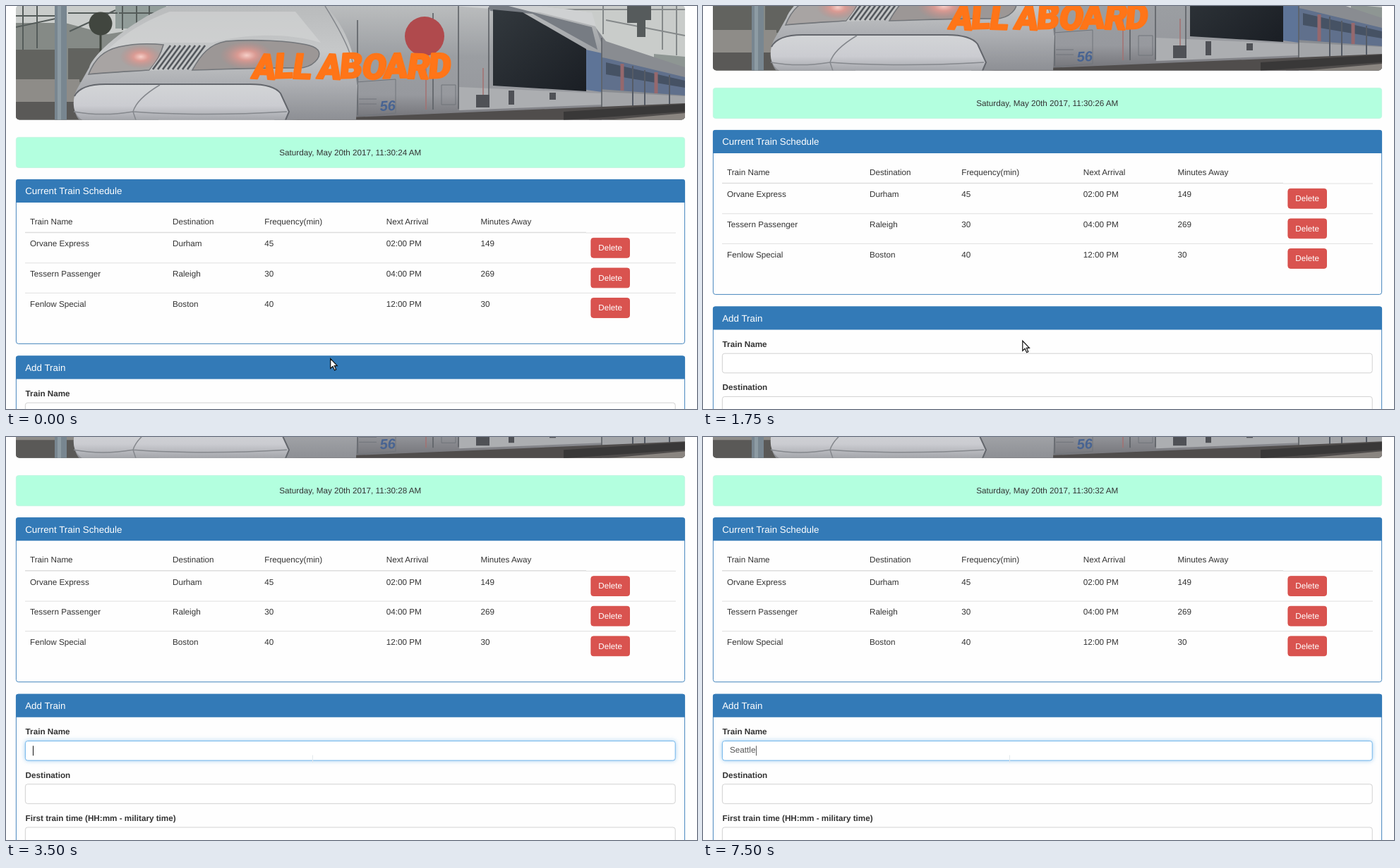
Write an HTML page that moves like this. It is 979 px wide and 572 px high and loops after 8 s.

```html
<!DOCTYPE html>
<html lang="en">
<head>
<meta charset="utf-8">
<title>Train schedule</title>
<style>
  html, body { margin: 0; width: 100%; height: 100%; overflow: hidden; background: #fefefe; }
  svg { display: block; }
  text { font: 11.7px "Liberation Sans", Arial, sans-serif; fill: #333; white-space: pre;
    text-rendering: geometricPrecision; }
  .title { font-size: 13.35px; fill: #fff; }
  .label { font-weight: bold; }
  .mid { text-anchor: middle; }
  .light { fill: #fff; }
  .typed { fill: #555; }
  .number { font: italic bold 20px "Liberation Sans", Arial, sans-serif; fill: #486492; }
  .banner { font: 900 49px Roboto, "Open Sans", sans-serif; letter-spacing: -1.2px; word-spacing: -1px;
    fill: #ff7518; stroke: #ff7518; stroke-width: 2.6; stroke-linejoin: round; }
  .field { fill: #fff; stroke: #ccc; stroke-width: .9; }
  .field.focus { stroke: #66afe9; filter: drop-shadow(0 0 3px rgba(102, 175, 233, .6)); }
</style>
</head>
<body>
<svg width="979" height="572" viewBox="0 0 979 572">
  <defs>
    <clipPath id="photo"><rect x="14" y="-1" width="948" height="162.5" rx="5"/></clipPath>
    <linearGradient id="nose" x1="0" y1="0" x2="0" y2="1">
      <stop offset="0" stop-color="#b9bbbc"/><stop offset=".4" stop-color="#c6c8c9"/>
      <stop offset=".7" stop-color="#abadb1"/><stop offset="1" stop-color="#8d8f94"/>
    </linearGradient>
    <linearGradient id="bonnet" x1="0" y1="0" x2="0" y2="1">
      <stop offset="0" stop-color="#d3d5d7"/><stop offset=".6" stop-color="#cbccd1"/>
      <stop offset="1" stop-color="#a3a5aa"/>
    </linearGradient>
    <linearGradient id="side" x1="0" y1="0" x2="0" y2="1">
      <stop offset="0" stop-color="#bbbdbe"/><stop offset=".45" stop-color="#9b9ea2"/>
      <stop offset=".78" stop-color="#97999e"/><stop offset="1" stop-color="#717176"/>
    </linearGradient>
    <linearGradient id="glass" x1="0" y1="0" x2="1" y2="1">
      <stop offset="0" stop-color="#33393e"/><stop offset="1" stop-color="#1a1e24"/>
    </linearGradient>
    <radialGradient id="lamp">
      <stop offset="0" stop-color="#f7cfc8"/><stop offset=".35" stop-color="#e09a92" stop-opacity=".9"/>
      <stop offset="1" stop-color="#c08a85" stop-opacity="0"/>
    </radialGradient>
  </defs>

  <g id="page">
    <g clip-path="url(#photo)">
      <!-- station -->
      <path fill="#c9ccca" d="M14-1h948v163H14z"/>
      <path fill="#858a86" d="M14 24h70l60 16 72-12v134H14z"/>
      <path fill="#62635f" d="M14 62h60v44H14zM88 60h45v48H88z"/>
      <path fill="#8e8c88" d="M14 104h90v57H14z"/>
      <path fill="#5a5957" d="M14 136h94v26H14z"/>
      <path fill="#929d9a" d="M155 0h72v32h-72z"/>
      <path fill="none" stroke="#555c5a" stroke-width="2" d="M14 14h58M14 30l56-12M24 0v62M44 0v60M88 10h70M90 36l65-30M160 10h55M165 0v34M185 0v34M203 0v26"/>
      <path fill="#788690" d="M69 0h17v162H69z"/>
      <path fill="#8d9ba3" d="M73 0h5v162h-5z"/>
      <circle cx="134" cy="25" r="16.5" fill="#41463f"/>
      <path stroke="#41463f" stroke-width="3" d="M134 40v28"/>

      <!-- far coaches, gantry -->
      <path fill="none" stroke="#85898a" stroke-width="2" d="M770 5h192M850 20l112 22M846 0v40M930 0v62M950 0v70"/>
      <path fill="#565b5c" d="M880 0h34v20h-8v24h-12V24h-14z"/>
      <path fill="#8e9693" d="M918 68l44 4v25h-44z"/>
      <path fill="#898c91" d="M826 18l24 32 112 37v75H826z"/>
      <path fill="#60708c" d="M828 70l22 4 112 27v26l-134-10z"/>
      <path fill="#465264" d="M850 80l112 26v10l-112-19z"/>
      <path fill="#a3a5a8" d="M828 121l134 7v14l-134 2z"/>
      <path stroke="#96686d" stroke-width="5" d="M873 82v38M921 94v30"/>
      <path stroke="#555b65" stroke-width="2" d="M888 85v58M905 91v52M940 98v44"/>

      <!-- power car -->
      <path fill="url(#side)" d="M400-1h350l78 10 16 45v108H380z"/>
      <path fill="#cfd1d2" d="M620-1h130l80 10 6 20-80-20z"/>
      <path fill="#777c83" d="M684 0h28l118 30 8 32-92-51-60-4z"/>
      <path fill="#5e7497" d="M822 62l22 5v55l-22-3z"/>
      <path fill="url(#glass)" d="M690 5l42 4 90 52v60l-132-8z"/>
      <path fill="#acaeb1" d="M642 115l202 9v16l-202 8z"/>
      <path fill="#90939800" d="M602 10l40-10v146l-40 5z"/>
      <path fill="none" stroke="#5d6166" stroke-width="1.6" d="M605 10v137M641 0v146M684 2v140M844 45v104M498 20v135"/>
      <path stroke="#a57070" stroke-width="1.5" d="M595 82v65M676 88v44"/>
      <path fill="none" stroke="#71757b" d="M496 108l56-4v48l-54 4zM500 132h25M500 139h25M617 112h20v28h-20z"/>
      <path fill="#4f5156" d="M666 126h19v18h-19zM712 120h8v20h-8zM770 123h9v10h-9z"/>
      <path fill="#504d4c" d="M390 162l170-7 402-17v24z"/>
      <path fill="#393838" d="M790 150l172-11v11l-172 12z"/>
      <path fill="#8a8580" d="M850 162l112-10v10z"/>
      <circle cx="593" cy="43" r="28" fill="#b04a4d"/>
      <text class="number" x="530" y="149" transform="rotate(-3 530 149)">56</text>

      <!-- nose -->
      <path fill="url(#nose)" d="M232-1h220c26 26 44 66 46 112l-2 51H104c-10-12-10-30-4-43l18-32c8-24 70-72 114-88z"/>
      <path fill="#d6d7d7" opacity=".6" d="M232 8h178l36 44c-50-15-110-12-154 0h-68c-30 0-60 8-90 22 24-30 60-52 98-66z"/>
      <path fill="url(#bonnet)" d="M97 128c6-12 20-17 44-17h205c22 0 36 4 43 13l12 26-6 12H108c-12-8-14-22-11-34z"/>
      <path fill="none" stroke="#63666c" stroke-width="2" d="M97 128c6-12 20-17 44-17h205c22 0 36 4 43 13l12 26-5 12"/>
      <path fill="none" stroke="#85888d" stroke-width="1.5" d="M218 112c-20 12-34 24-38 38l4 12M96 150c28 5 54 5 84 0 70 5 150 4 218 0M452 0c28 45 42 75 46 112"/>
      <path fill="#a8a4a3" stroke="#73767a" stroke-width="1.6" d="M117 97c9-23 22-34 43-39 22-5 44-5 63-3-4 15-11 26-20 36-30 2-57 3-86 6z"/>
      <path fill="#9c9796" stroke="#73767a" stroke-width="1.6" d="M264 91c12-22 24-37 48-41 37-3 91-1 118 6 15 4 18 13 8 23-6 6-14 9-24 9-50-1-100 2-150 3z"/>
      <ellipse cx="191" cy="72" rx="30" ry="17" fill="url(#lamp)"/>
      <ellipse cx="341" cy="70" rx="38" ry="20" fill="url(#lamp)"/>
      <path fill="#c4c6c7" d="M203 92l28-38h56l-25 36z"/>
      <path id="grille" stroke="#54585d" stroke-width="2.6" fill="none"/>
    </g>
    <text class="banner mid" transform="translate(487.5 102.6) skewX(-7)" rotate="3 -2 2 0 3 -2 3 -2 2 -2">ALL ABOARD</text>

    <rect x="14.4" y="186.4" width="947.2" height="43" rx="3.3" fill="#b3ffdf" stroke="#c0f5e0" stroke-width=".9"/>
    <text id="clock" x="387.3" y="211.6"></text>
    <g id="panels"></g>
    <text id="typed" class="typed" x="38" y="580.2"></text>
    <path id="caret" d="M.5 570v14" stroke="#222" stroke-width="1.1"/>
  </g>

  <path id="arrow" fill="#fff" stroke="#111" stroke-width="1.2" d="M0 0V14L3.3 11 5.8 16.4 8 15.4 5.6 10.1H9.6Z"/>
  <path id="beam" fill="none" stroke="#e3e8ec" d="M434.5 451.5v11"/>
</svg>
<script>
const $ = id => document.getElementById(id);
const text = (x, y, str, cls = '') => `<text x="${x}" y="${y}" class="${cls}">${str}</text>`;
const line = (x1, x2, y, w) => `<path d="M${x1} ${y}H${x2}" stroke="#ddd" stroke-width="${w}"/>`;

function panel(y, h, title) {
  return `<rect x="14.4" y="${y + .4}" width="947.2" height="${h}" rx="3.3" fill="#fefefe" stroke="#337ab7" stroke-width=".9"/>
    <path d="M14 ${y + 33}v-30q0-3 3-3h942q3 0 3 3v30z" fill="#337ab7"/>` + text(27.2, y + 21.4, title, 'title');
}

const columns = [34, 236, 366.3, 538.7, 672.5];
const cells = (row, y) => row.map((s, i) => text(columns[i], y, s)).join('');
const trains = [
  ['Orvane Express', 'Durham', '45', '02:00 PM', '149'],
  ['Tessern Passenger', 'Raleigh', '30', '04:00 PM', '269'],
  ['Fenlow Special', 'Boston', '40', '12:00 PM', '30'],
];
const labels = ['Train Name', 'Destination', 'First train time (HH:mm - military time)'];

let html = panel(246, 233, 'Current Train Schedule');
html += cells(['Train Name', 'Destination', 'Frequency(min)', 'Next Arrival', 'Minutes Away'], 310);
html += line(27, 822, 321.5, 1.6) + line(822, 949, 322, .9);
trains.forEach((row, i) => {
  const y = 322 + i * 42.6;
  if (i) html += line(27, 949, y + .2, .9);
  html += cells(row, y + 19.3);
  html += `<rect x="828.9" y="${y + 7.4}" width="54.6" height="27.8" rx="3.3" fill="#d9534f" stroke="#d64a46" stroke-width=".9"/>`;
  html += text(856.2, y + 25.2, 'Delete', 'mid light');
});

html += panel(496.5, 300, 'Add Train');
labels.forEach((label, i) => {
  const y = 554 + i * 61.25;
  html += text(27.6, y, label, 'label');
  html += `<rect class="field" x="27.4" y="${y + 9.2}" width="920.8" height="27.6" rx="3.3"/>`;
});
$('panels').innerHTML = html;

$('grille').setAttribute('d', Array.from({ length: 8 }, (_, i) => `M${208 + i * 7} 90l25-34`).join(''));

// Step tables: [start in ms, value...]
const scroll = [[0, 0], [1500, 5], [1750, 70], [2000, 113.3], [2250, 131.7]];
const seconds = [[0, 24], [250, 25], [1250, 26], [2000, 27], [3000, 28], [4000, 29], [5000, 30], [6000, 31], [7000, 32]];
const pointer = [[0, 459.7, 500.5], [250, 456, 486], [500, 452.8, 475.3], [2500, 446, 468], [2750, -50, 0]];
const letters = [[0, 0], [4500, 1], [5250, 2], [6000, 3], [6250, 4], [6750, 5], [7000, 6], [7250, 7]];
const caret = [[0, 0], [3250, 1], [3750, 0], [4250, 1], [5000, 0], [5250, 1], [5750, 0], [6000, 1], [7250, 0], [7500, 1]];
const at = (steps, t) => steps.findLast(s => s[0] <= t).slice(1);

const field = document.querySelector('.field');
const start = performance.now();

function draw(now) {
  const t = Math.max(0, now - start) % 8000;
  const [count] = at(letters, t);
  const [x, y] = at(pointer, t);
  $('page').setAttribute('transform', `translate(0 ${-at(scroll, t)[0]})`);
  $('clock').textContent = `Saturday, May 20th 2017, 11:30:${at(seconds, t)[0]} AM`;
  $('arrow').setAttribute('transform', `translate(${x} ${y})`);
  $('beam').style.opacity = t >= 2750 ? 1 : 0;
  field.classList.toggle('focus', t >= 3250);
  $('typed').textContent = 'Seattle'.slice(0, count);
  const end = count ? 38.6 + $('typed').getComputedTextLength() : 38;
  $('caret').setAttribute('transform', `translate(${Math.round(end)} 0)`);
  $('caret').setAttribute('stroke', count ? '#666' : '#222');
  $('caret').style.opacity = at(caret, t)[0];
  requestAnimationFrame(draw);
}
draw(start);
</script>
</body>
</html>
```
